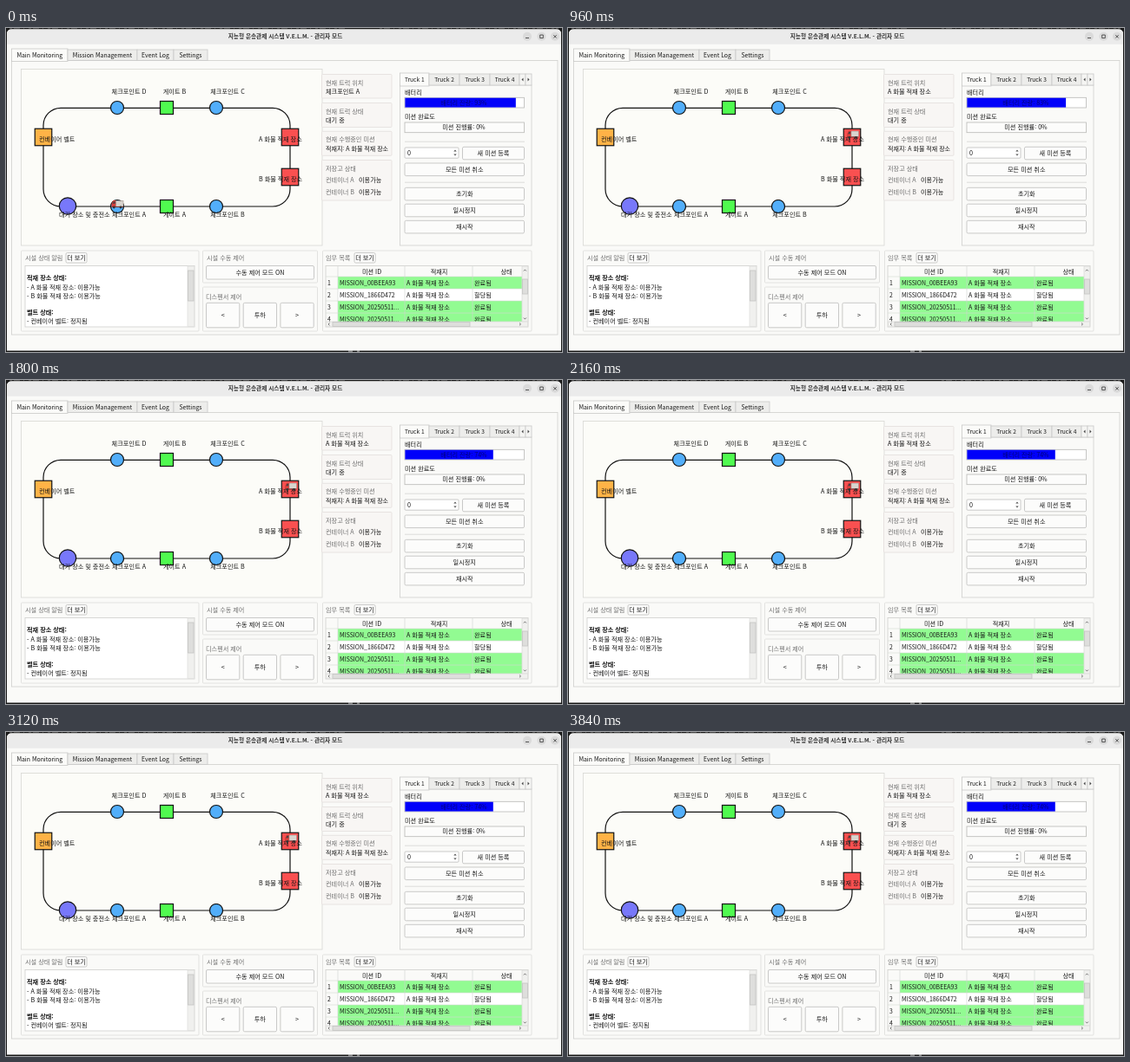
These frames come from a looping animation (640x374 px, 3960 ms). An HTML page:

```html
<!DOCTYPE html>
<html lang="ko">
<head>
<meta charset="utf-8">
<style>
  html, body { margin: 0; width: 100%; height: 100%; overflow: hidden; background: #111; }
  svg { display: block; width: 640px; height: 374px; }
  text { font-family: "Noto Sans CJK KR", "Noto Sans CJK JP", "Noto Sans CJK SC", sans-serif; white-space: pre; }
</style>
</head>
<body>
<svg id="stage" viewBox="0 0 640 374" xmlns="http://www.w3.org/2000/svg"></svg>
<script>
const LOOP = 3960, GRAY = '#707070', LINE = '#d2d2d0';
const stage = document.getElementById('stage');

const rect = (x, y, w, h, fill = '#fff', stroke = LINE, extra = '') =>
  `<rect x="${x}" y="${y}" width="${w}" height="${h}" fill="${fill}" stroke="${stroke}" stroke-width=".8" ${extra}/>`;
const path = (d, stroke = '#333', width = 0.8) =>
  `<path d="${d}" fill="none" stroke="${stroke}" stroke-width="${width}"/>`;
const text = (x, y, s, { size = 7.15, fill = '#161616', anchor = 'start', extra = '' } = {}) =>
  `<text x="${x}" y="${y}" font-size="${size}" fill="${fill}" text-anchor="${anchor}" ${extra}>${s}</text>`;
const center = (x, y, s, opts = {}) => text(x, y, s, { anchor: 'middle', ...opts });
const bold = { extra: 'font-weight="700"' };
const gray = { fill: GRAY };
const button = (x, y, w, h, label) =>
  rect(x, y, w, h, '#fcfcfb', '#bdbdbb', 'rx="1.5"') + center(x + w / 2, y + h / 2 + 2.6, label);
const group = (x, y, w, h) => rect(x, y, w, h, '#fafaf8', '#dcdcda', 'rx="1"');

function tabs(edges, labels, top, bottom, baseline, size) {
  return labels.map((label, i) => {
    const x = edges[i], y = top + (i ? 1 : 0);
    return rect(x, y, edges[i + 1] - x, bottom - y + (i ? 0 : 1), i ? '#ededeb' : '#fbfbf9', '#c9c9c7') +
      center((x + edges[i + 1]) / 2, baseline, label, { size });
  }).join('');
}

function windowFrame() {
  const controls = [600, 616.5, 632].map(x => `<circle cx="${x}" cy="9.8" r="5" fill="#dadada"/>`).join('');
  return '<rect width="640" height="374" fill="#181818"/>' +
    path('M4 .5H390M430 .5H636', '#777', 0.5).replace('/>', ' stroke-dasharray="3 2 7 4 1 5"/>') +
    '<path d="M1 372.5V7q0-5.5 5.5-5.5H633.5q5.5 0 5.5 5.5V372.5Z" fill="#fafaf8"/>' +
    '<path d="M1 18.8V7q0-5.5 5.5-5.5H633.5q5.5 0 5.5 5.5V18.8Z" fill="#ebebeb"/>' +
    '<path d="M394 373h5M404 373h3" stroke="#ddd"/>' +
    center(321.5, 12.3, '지능형 운송관제 시스템 V.E.L.M. - 관리자 모드', { size: 6.65, fill: '#333', ...bold }) +
    controls + path('M598 11.5h4M614.7 8h3.6v3.6h-3.6zM630.3 8.1l3.4 3.4M633.7 8.1l-3.4 3.4', '#333', 0.8) +
    rect(6.5, 37.5, 628.5, 316.5, '#fafaf8', '#cfcfcd') +
    tabs([6.5, 71, 151, 193, 232], ['Main Monitoring', 'Mission Management', 'Event Log', 'Settings'], 24, 37.5, 33.6, 6.9);
}

function routeMap() {
  const square = (x, y, size, fill) =>
    rect(x - size / 2, y - size / 2, size, size, fill, '#111', 'style="stroke-width:1.2"');
  const dot = (x, y, r, fill) => `<circle cx="${x}" cy="${y}" r="${r}" fill="${fill}" stroke="#111" stroke-width="1.2"/>`;
  return rect(17.5, 47.5, 346.5, 203.5, '#fcfcf8', '#d8d8d4') +
    rect(43, 92.3, 284, 113.7, 'none', '#111', 'rx="20" style="stroke-width:1.2"') +
    [[128, 92], [242, 92], [128, 206], [242, 206]].map(([x, y]) => dot(x, y, 7.5, '#52aefa')).join('') +
    square(185, 92, 15, '#50fa50') + square(185, 206, 15, '#50fa50') +
    square(43, 126, 19.5, '#ffb347') + dot(71, 205.5, 9.7, '#7878fa') +
    square(327, 126, 19.5, '#fa5050') + square(327, 172, 19.5, '#fa5050') +
    center(141.5, 75.6, '체크포인트 D') + center(194, 75.6, '게이트 B') + center(255, 75.6, '체크포인트 C') +
    text(38, 131, '컨베이어 벨트') + text(291, 131, 'A 화물 적재 장소') + text(291, 176.6, 'B 화물 적재 장소') +
    text(61, 218, '대기 장소 및 충전소') + center(141.5, 218, '체크포인트 A') +
    center(194, 218, '게이트 A') + center(255, 218, '체크포인트 B') +
    `<g id="truck">
      <path d="M-6.5 4V0l2-4H-1V4Z" fill="#d8403c"/><path d="M-5.4-.2l1.3-2.5h1.8v2.5Z" fill="#503c40"/>
      <rect x="-1.5" y="-3.5" width="8.5" height="6.5" fill="#d9d4ce" stroke="#968880" stroke-width=".5"/>
      <path d="M-6.5 3.5H7" stroke="#7a3030"/>
      <circle cx="-3.7" cy="4" r="1.4" fill="#333"/><circle cx="4" cy="4" r="1.4" fill="#333"/>
    </g>`;
}

function statusBoxes() {
  const box = (y, h, title) => rect(363.5, y, 80.5, h, '#f8f6f4', '#e4dfdc', 'rx="1"') + text(368, y + 12, title, gray);
  return box(53.5, 27.5, '현재 트럭 위치') + text(368, 76, '', { extra: 'id="place"' }) +
    box(86.5, 28, '현재 트럭 상태') + text(368, 109.3, '대기 중') +
    box(119.3, 28, '현재 수행중인 미션') + text(368, 142.3, '적재지: A 화물 적재 장소', { size: 7 }) +
    box(152.5, 46.5, '저장고 상태') +
    ['A', 'B'].map((id, i) => text(368, 178 + i * 14, '컨테이너 ' + id, gray) + text(406, 178 + i * 14, '이용가능')).join('');
}

function truckPanel() {
  const arrow = (x, d) => rect(x, 53, 7, 13, '#f5f5f3', '#c9c9c7') +
    `<path d="M${x + 3.5 - d} 57.5l${2 * d} 2l${-2 * d} 2Z" fill="#444"/>`;
  return rect(453.5, 66, 151.5, 185, '#fafaf8', '#cfcfcd') +
    tabs([453.5, 487, 522, 557, 591], ['Truck 1', 'Truck 2', 'Truck 3', 'Truck 4'], 52, 66, 61.8, 6.6) +
    arrow(591, -1) + arrow(598, 1) +
    text(459, 76.7, '배터리') + rect(459, 80.3, 137.5, 11.7, '#fff', '#b8b8b6') +
    '<rect id="charge" x="459.4" y="80.7" height="10.9" fill="#0000fa"/>' +
    center(527, 88.8, '', { fill: '#000078', extra: 'id="level"' }) +
    text(459, 105.4, '미션 완료도') + rect(459, 109, 137.5, 11.7, '#fcfcfb', '#b8b8b6') +
    center(527, 117.3, '미션 진행률: 0%') +
    path('M459 131.2H597M459 178.2H597', '#d6d6d4') +
    rect(459, 138, 62, 12.2, '#fff', '#bdbdbb', 'rx="1"') + text(462, 146.6, '0') +
    '<path d="M515.3 142.6l1.7-2l1.7 2ZM515.3 145.6l1.7 2l1.7-2Z" fill="#555"/>' +
    button(525.5, 137.3, 71, 14.5, '새 미션 등록') +
    [['모든 미션 취소', 156], ['초기화', 184.3], ['일시정지', 203.2], ['재시작', 222.3]]
      .map(([label, y]) => button(459, y, 137.5, 14.6, label)).join('');
}

function facilityPanels() {
  return group(17.5, 257, 204.5, 93) + text(22, 267.7, '시설 상태 알림', gray) + button(69, 259.5, 24, 11.5, '더 보기') +
    rect(22, 274.5, 195, 70.5, '#fff', '#cfcfcd') + rect(209, 275, 7.5, 69.5, '#f0f0ee', '#e0e0de') +
    rect(209.5, 280, 6.5, 35, '#dededc', '#c4c4c2') +
    text(24, 290.7, '적재 장소 상태:', bold) + text(24, 301.6, '- A 화물 적재 장소: 이용가능') +
    text(24, 312.4, '- B 화물 적재 장소: 이용가능') + text(24, 330.7, '벨트 상태:', bold) +
    text(24, 341.4, '- 컨베이어 벨트: 정지됨') +
    group(226.5, 257, 132, 37) + text(231, 267.7, '시설 수동 제어', gray) + button(230.5, 274.5, 124, 15.5, '수동 제어 모드 ON') +
    group(226.5, 299, 132, 51) + text(230, 312.7, '디스펜서 제어', gray) +
    ['&lt;', '투하', '&gt;'].map((label, i) => button(230.5 + i * 42.7, 317.3, 38.3, 28.5, label)).join('');
}

function missionTable() {
  const rows = [['00BEEA93', '완료됨'], ['1866D472', '할당됨'], ['20250511...', '완료됨'], ['20250511...', '완료됨']];
  const cells = rows.map(([id, state], i) => {
    const y = 287 + i * 14, base = y + 9.6;
    return `<rect x="382" y="${y}" width="219" height="14" fill="${i === 1 ? '#fff' : '#92fb92'}"/>` +
      path(`M368 ${y}H601`, '#d0d8d0', 0.6) + text(370, base, i + 1, { size: 6.9 }) +
      text(384, base, 'MISSION_' + id, { size: 6.95 }) + text(461, base, 'A 화물 적재 장소') + text(539, base, state);
  }).join('');
  return group(364.5, 257, 240.5, 93) + text(368, 267.7, '임무 목록', gray) + button(401, 259.5, 24, 11.5, '더 보기') +
    rect(368, 274.5, 233, 70.5, '#fafaf8', '#cfcfcd') +
    '<clipPath id="rows"><rect x="368" y="274" width="226" height="65"/></clipPath>' +
    `<g clip-path="url(#rows)">${cells}${path('M382 275V339M459 275V339M537 275V339', '#d0d4d0', 0.6)}</g>` +
    center(421, 283.7, '미션 ID') + center(498.5, 283.7, '적재지') + center(576, 283.7, '상태') +
    rect(594, 275, 6.8, 64, '#f0f0ee', '#dcdcda') + rect(594.4, 290, 6, 17, '#dededc', '#c4c4c2') +
    path('M596 280.5l1.4-1.6l1.4 1.6M596 334.5l1.4 1.6l1.4-1.6', '#555') +
    rect(368.4, 339, 232.2, 5.8, '#f0f0ee', '#dcdcda') + rect(376, 339.4, 158, 5, '#dededc', '#c4c4c2') +
    path('M372.5 340.5l-1.5 1.4l1.5 1.4M591 340.5l1.5 1.4l-1.5 1.4', '#555');
}

stage.innerHTML = windowFrame() + routeMap() + statusBoxes() + truckPanel() + facilityPanels() + missionTable();

const [truck, place, charge, level] = ['truck', 'place', 'charge', 'level'].map(id => document.getElementById(id));
const stops = [
  { at: 0, x: 128, y: 203, name: '체크포인트 A' },
  { at: 240, x: 185, y: 203, name: '게이트 A' },
  { at: 480, x: 242, y: 203, name: '체크포인트 B' },
  { at: 720, x: 327.5, y: 122.5, name: 'A 화물 적재 장소' },
];
const battery = [{ at: 0, value: 93 }, { at: 480, value: 83 }, { at: 1200, value: 74 }];
const current = (list, t) => list.filter(item => item.at <= t).pop();

function draw() {
  const t = performance.now() % LOOP;
  const stop = current(stops, t), { value } = current(battery, t);
  truck.setAttribute('transform', `translate(${stop.x} ${stop.y})`);
  place.textContent = stop.name;
  charge.setAttribute('width', value * 1.37);
  level.textContent = `배터리 잔량: ${value}%`;
  requestAnimationFrame(draw);
}
draw();
</script>
</body>
</html>
```
